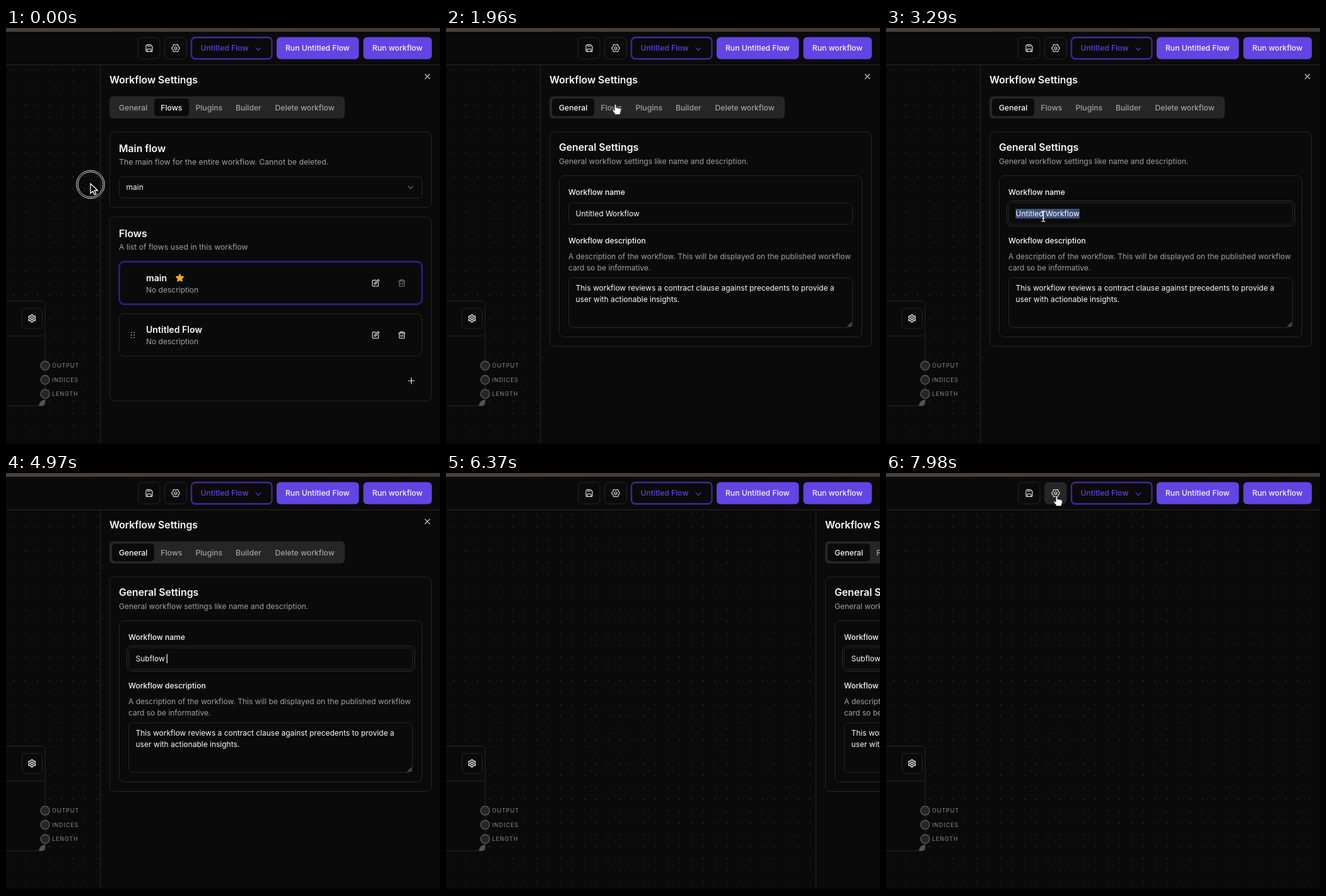
These frames come from a looping animation (688 by 662 pixels, 8000 ms). An HTML page:

```html
<!DOCTYPE html>
<html lang="en">
<head>
<meta charset="utf-8">
<title>Workflow settings</title>
<style>
  html, body { margin: 0; width: 100%; height: 100%; overflow: hidden; background: #0a0a0a; }
  svg { display: block; }
  text { font: 400 12px Inter, sans-serif; fill: #fafafa; white-space: pre; }
  .title { font-size: 15.75px; font-weight: 600; }
  .row { font-size: 14.1px; font-weight: 600; }
  .label { font-weight: 500; }
  .button, .tabs text { font-size: 12.15px; font-weight: 500; }
  .muted, .tabs text { fill: #a1a1a1; }
  .lead { font-size: 12.25px; }
  .tabs .on { fill: #fafafa; }
  .port { font-size: 9px; letter-spacing: .9px; fill: #8a8a8a; }
  .box { fill: #0a0a0a; stroke: #272727; }
  .accent { fill: #0a0a0a; stroke: #4a20b4; stroke-width: 1.3; }
  .glow { fill: none; stroke: #4a20b4; stroke-width: 4; opacity: .2; }
  .icon { fill: none; stroke: #f0f0f0; stroke-width: 1.1; stroke-linecap: round; stroke-linejoin: round; }
  .dim { stroke: #7a7a7a; }
</style>
</head>
<body>
<svg width="688" height="662" viewBox="0 0 688 662">
  <defs>
    <path id="edit" d="M.5-4.6H-3.4a1.4 1.4 0 0 0-1.4 1.4V3.6A1.4 1.4 0 0 0-3.4 5H3.4A1.4 1.4 0 0 0 4.8 3.6V-.2M-1.8 2L-1.3-.2 3.6-5a1.2 1.2 0 0 1 1.7 1.7L.4 1.5Z"/>
    <path id="trash" d="M-5-3.4H5M-4-3.4V4a1.2 1.2 0 0 0 1.2 1.2H2.8A1.2 1.2 0 0 0 4 4V-3.4M-2-3.4V-4.6a.9.9 0 0 1 .9-.9H1.1a.9.9 0 0 1 .9.9V-3.4M-1.4-.8V2.6M1.4-.8V2.6"/>
    <path id="chevron" d="M-3.7-1.8L0 1.9 3.7-1.8"/>
    <path id="arrow" d="M0 0V15.5L3.7 12 6.2 17.6 8.8 16.5 6.3 11H11.3Z" fill="#000" stroke="#fff" stroke-width="1.3"/>
    <path id="hand" d="M-1.4 1.2a1.4 1.4 0 0 1 2.8 0V5.4c.6-.8 2.4-.7 2.7.4c.8-.7 2.3-.4 2.5.7c1-.5 2.2.1 2.2 1.3V10.5c0 1.5-1.2 2.6-1.5 5.5H-.2c-.6-2.2-3-3.8-4.2-6.2c-.6-1.4 1-2.2 2-1.2l1 1.2Z" fill="#fff" stroke="#111" stroke-width=".8"/>
    <path id="beam" d="M-3-8.3Q0-8.3 0-6.5Q0-8.3 3-8.3M0-6.5V6.5M-3 8.3Q0 8.3 0 6.5Q0 8.3 3 8.3M-1.6 3.6H1.6" fill="none" stroke="#fff" stroke-width="1.2"/>
    <linearGradient id="strip"><stop stop-color="#4a4039"/><stop offset="1" stop-color="#403732"/></linearGradient>
  </defs>

  <rect width="688" height="662" fill="#0a0a0a"/>
  <path id="dots" stroke="#404040" stroke-width="1.6" stroke-linecap="round"/>

  <!-- node -->
  <path class="box" d="M-5 433.5H56a6 6 0 0 1 6 6V594a6 6 0 0 1-6 6H-5ZM-5 489H62"/>
  <rect class="box" x="25.5" y="445" width="32" height="32" rx="5"/>
  <path id="cog" class="icon" style="stroke-width:1.4" transform="translate(41.2 461)"/>
  <path d="M62 590V595a5 5 0 0 1-5 5H52Q53 591 62 590Z" fill="#525252"/>
  <g fill="#262626" stroke="#5a5a5a" stroke-width="1.4">
    <circle cx="62" cy="536" r="7"/><circle cx="62" cy="558.5" r="7"/><circle cx="62" cy="581" r="7"/>
  </g>
  <text class="port" x="73" y="539.2">OUTPUT</text>
  <text class="port" x="73" y="561.7">INDICES</text>
  <text class="port" x="73" y="584.2">LENGTH</text>

  <g id="panel">
    <rect x="149.5" y="58" width="560" height="620" fill="#0a0a0a" stroke="#2a2a2a"/>
    <text class="title" x="164" y="87.6">Workflow Settings</text>
    <path class="icon" d="M664.3 73.3l7.4 7.4m0-7.4l-7.4 7.4"/>
    <rect x="164" y="108.5" width="373" height="35" rx="6" fill="#262626"/>
    <rect id="pill" y="112" height="28" rx="5" fill="#0a0a0a"/>
    <g class="tabs">
      <text id="generalTab" x="179" y="130.8">General</text>
      <text id="flowsTab" x="245.3" y="130.8">Flows</text>
      <text x="300.5" y="130.8">Plugins</text>
      <text x="364" y="130.8">Builder</text>
      <text x="426.5" y="130.8">Delete workflow</text>
    </g>

    <g id="flowsPage">
      <rect class="box" x="164.5" y="165" width="510" height="120" rx="8"/>
      <text class="title" x="179" y="197">Main flow</text>
      <text class="muted lead" x="179" y="217">The main flow for the entire workflow. Cannot be deleted.</text>
      <rect class="box" x="179.5" y="236" width="480" height="34" rx="6"/>
      <text x="190.5" y="257.3">main</text>
      <use href="#chevron" class="icon dim" transform="translate(641.5 253)"/>

      <rect class="box" x="164.5" y="300" width="510" height="292" rx="8"/>
      <text class="title" x="179" y="332">Flows</text>
      <text class="muted lead" x="179" y="352.2">A list of flows used in this workflow</text>
      <rect class="accent" x="179.5" y="371" width="480" height="67.5" rx="8"/>
      <rect class="glow" x="179.5" y="371" width="480" height="67.5" rx="8"/>
      <text class="row" x="222" y="401.5">main</text>
      <path d="M275.5 391l1.7 3.6 4 .5-2.9 2.8.7 4-3.5-1.9-3.5 1.9.7-4-2.9-2.8 4-.5Z" fill="#f9b012" stroke="#f9b012" stroke-width="1.6" stroke-linejoin="round"/>
      <text class="muted" x="222" y="419.5">No description</text>
      <use href="#edit" class="icon" transform="translate(585.7 405)"/>
      <use href="#trash" class="icon dim" transform="translate(627.5 405)"/>

      <rect class="box" x="179.5" y="453.5" width="480" height="67.5" rx="8"/>
      <path d="M198.8 483.5v0m0 4v0m0 4v0m4.4-8v0m0 4v0m0 4v0" class="icon" style="stroke-width:1.6"/>
      <text class="row" x="222" y="483.7">Untitled Flow</text>
      <text class="muted" x="222" y="502">No description</text>
      <use href="#edit" class="icon" transform="translate(585.7 487.5)"/>
      <use href="#trash" class="icon" transform="translate(627.5 487.5)"/>
      <path class="icon" d="M637.7 560h9.6m-4.8-4.8v9.6"/>
    </g>

    <g id="generalPage">
      <rect class="box" x="164.5" y="165" width="510" height="340.5" rx="8"/>
      <text class="title" x="179" y="194.7">General Settings</text>
      <text class="muted" x="179" y="215.5">General workflow settings like name and description.</text>
      <rect class="box" x="179.5" y="234.5" width="480" height="256" rx="8"/>
      <text class="label" x="194" y="264.5">Workflow name</text>
      <rect id="focus" class="box" x="191.5" y="274.5" width="456.5" height="40" rx="8" style="stroke:#303030"/>
      <rect class="box" x="194.5" y="277.5" width="450" height="34" rx="6"/>
      <rect id="selection" x="205.5" y="287" height="15.5" fill="#3d5078"/>
      <text id="name" x="205.5" y="299.2"></text>
      <rect id="caret" y="287.5" width="1.2" height="14.5" fill="#fff"/>
      <text class="label" x="194" y="341.7">Workflow description</text>
      <text class="muted" x="194" y="367.2">A description of the workflow. This will be displayed on the published workflow</text>
      <text class="muted" x="194" y="384.7">card so be informative.</text>
      <rect class="box" x="194.5" y="396.5" width="450" height="79" rx="6"/>
      <text x="205.5" y="417.2">This workflow reviews a contract clause against precedents to provide a</text>
      <text x="205.5" y="434.7">user with actionable insights.</text>
      <path class="icon" style="stroke-width:.8" d="M637 474l6-6m-2.5 6l2.5-2.5"/>
    </g>
  </g>

  <!-- header -->
  <path d="M0 6H688V58H0Z" fill="#0a0a0a"/>
  <path d="M0 58.5H688" stroke="#2a2a2a"/>
  <path d="M0 0H688V6H0Z" fill="url(#strip)"/>
  <path d="M0 659.5H688V662H0Z" fill="#050206"/>
  <rect class="box" x="209.5" y="15" width="34.5" height="34" rx="6"/>
  <path class="icon" transform="translate(227 32)" d="M-5-3.5A2 2 0 0 1-3-5.5H2L5-2.5V3.5A2 2 0 0 1 3 5.5H-3A2 2 0 0 1-5 3.5ZM-2-5.5V-3H1.5M-2.8 5.3V1.2H2.8V5.3"/>
  <rect id="settings" class="box" x="251.5" y="15" width="34.5" height="34" rx="6"/>
  <path id="nut" class="icon" transform="translate(269 32)"/>
  <rect class="accent" style="stroke:#583ac8" x="294" y="15" width="127.5" height="34" rx="6"/>
  <rect class="glow" x="294" y="15" width="127.5" height="34" rx="6"/>
  <text class="button" x="308.5" y="36.3" style="fill:#6142dc">Untitled Flow</text>
  <use href="#chevron" class="icon" style="stroke:#6142dc" transform="translate(400 33.5)"/>
  <rect x="429" y="14.5" width="130.5" height="35" rx="6" fill="#6344e4"/>
  <text class="button" x="443" y="36.3">Run Untitled Flow</text>
  <rect x="566.5" y="14.5" width="108.5" height="35" rx="6" fill="#6344e4"/>
  <text class="button" x="580.8" y="36.3">Run workflow</text>

  <g id="ring" fill="none" stroke="#dcdcdc"><circle id="outer"/><circle id="inner"/></g>
  <use id="trail" href="#arrow" x="293.5" y="247"/>
  <use id="cursor"/>
</svg>
<script>
const $ = id => document.getElementById(id);
const set = (id, attrs) => { for (const k in attrs) $(id).setAttribute(k, attrs[k]); };
const show = (id, on) => { $(id).style.display = on ? '' : 'none'; };

const LOOP = 8000, STEP = 70;
// Pointer stops: time, x, y
const stops = [
  [0, 134, 247], [280, 134, 247], [700, 204, 137], [770, 204, 137], [980, 205, 126.5],
  [1190, 205, 126.5], [1260, 204, 117], [1540, 204, 117], [1960, 268.5, 121.5],
  [2170, 268.5, 121.5], [2940, 249.5, 299], [5390, 249.5, 299], [5600, 233, 272],
  [5880, 298, 197], [6020, 293.5, 247], [6860, 293.5, 247], [6930, 297, 237],
  [7420, 270.5, 41], [7490, 270.5, 41], [7560, 270.5, 42], [7700, 270.5, 42], [7980, 270.5, 36.5]
];
// Click rings: start, end, largest radius
const clicks = [[-140, 140, 22.3], [1260, 1540, 22.3], [2940, 3080, 18], [3080, 3290, 18]];
const typed = 'Subflow ', keyTimes = [3850, 4130, 4200, 4480, 4550, 4690, 4830, 4970];

function pointerAt(t) {
  const i = stops.findIndex(s => s[0] > t);
  if (i < 0) return stops[stops.length - 1].slice(1);
  const [a, b] = [stops[i - 1], stops[i]];
  const p = (t - a[0]) / (b[0] - a[0]), e = p * p * (3 - 2 * p);
  return [a[1] + (b[1] - a[1]) * e, a[2] + (b[2] - a[2]) * e];
}

// cubic-bezier(.4, 0, .2, 1)
function ease(x) {
  let lo = 0, hi = 1;
  for (let i = 0; i < 24; i++) {
    const s = (lo + hi) / 2, r = 1 - s;
    if (1.2 * s * r * r + .6 * s * s * r + s * s * s < x) lo = s; else hi = s;
  }
  return lo * lo * (3 - 2 * lo);
}

function draw(t) {
  const general = t >= 1330, selected = t >= 3080 && t < 3850;
  show('flowsPage', !general);
  show('generalPage', general);
  set('pill', general ? { x: 168, width: 67 } : { x: 235, width: 55 });
  $('generalTab').classList.toggle('on', general);
  $('flowsTab').classList.toggle('on', !general);

  const slide = ease(Math.min(1, Math.max(0, (t - 6213) / 297)));
  set('panel', { transform: `translate(${Math.round(slide * 540)} 0)` });
  show('panel', t < 6510);

  $('name').textContent = t < 3850 ? 'Untitled Workflow' : typed.slice(0, keyTimes.filter(k => k <= t).length);
  const width = general && t < 6510 ? $('name').getComputedTextLength() : 0;
  set('selection', { width });
  set('caret', { x: 205 + width });
  show('focus', t >= 2940);
  show('selection', selected);
  show('caret', t >= 3850);

  const [x, y] = pointerAt(t);
  const onButton = y < 50, onTab = t < 6200 && y > 110 && y < 141;
  const shape = onButton || onTab ? 'hand' : y > 275 ? 'beam' : 'arrow';
  set('cursor', { href: '#' + shape, x, y });
  show('cursor', t < 3990 || (t >= 5460 && t < 6020) || t >= 6930);
  show('trail', t >= 6930 && t < 7000);
  set('settings', { style: t > 7000 && onButton ? 'fill:#262626' : '' });

  const click = clicks.find(c => t >= c[0] && t < c[1]);
  show('ring', click);
  if (click) {
    const r = Math.min(click[2], 8.3 + (t - click[0]) * .1);
    set('ring', { transform: `translate(${x} ${y + 1.4})` });
    set('outer', { r });
    set('inner', { r: r - 2.4 });
  }
}

let dots = '';
for (let y = 66.7; y < 658; y += 18.8)
  for (let x = 12.4; x < 688; x += 18.82) dots += `M${x.toFixed(1)} ${y.toFixed(1)}h0`;
set('dots', { d: dots });

// Six-lobed outline around a round hole
function gearPath(radius, lobe, hole) {
  const points = Array.from({ length: 60 }, (_, i) => {
    const a = i * Math.PI / 30, r = radius + lobe * Math.cos(6 * a);
    return `${(r * Math.cos(a)).toFixed(2)} ${(r * Math.sin(a)).toFixed(2)}`;
  });
  return `M${points.join('L')}ZM${hole} 0A${hole} ${hole} 0 1 0-${hole} 0A${hole} ${hole} 0 1 0 ${hole} 0`;
}
set('nut', { d: gearPath(5.6, .75, 2) });
set('cog', { d: gearPath(5.1, -1, 1.9) });

const start = performance.now();
function frame() {
  const t = (performance.now() - start) % LOOP;
  draw(Math.floor(t / STEP) * STEP);
  requestAnimationFrame(frame);
}
frame();
</script>
</body>
</html>
```
